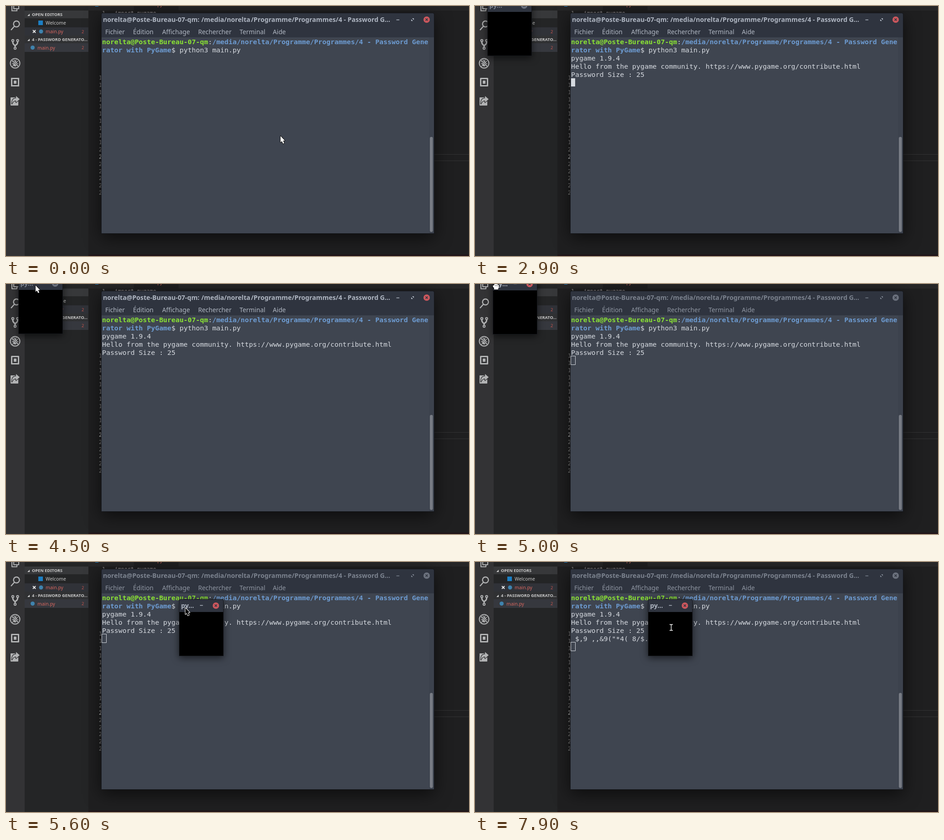
An HTML page with a canvas for the animation above (8 s loop, 1017 px wide and 550 px high).

```html
<!DOCTYPE html>
<html lang="fr">
<head>
<meta charset="utf-8">
<title>Terminal</title>
<style>
html, body { margin: 0; width: 100%; height: 100%; overflow: hidden; background: #1e1e1e; }
canvas { display: block; }
</style>
</head>
<body>
<canvas width="1017" height="550"></canvas>
<script>
const ctx = document.querySelector('canvas').getContext('2d');
const LOOP = 8000, STEP = 100;
const SANS = '"Noto Sans", "Open Sans", sans-serif';
const MONO = '"DejaVu Sans Mono", monospace';
const CELL = 8.96, ROW = 18, LEFT = 211, TOP = 69;
const USER = 'norelta', HOST = 'Poste-Bureau-07-qm';
const INK = '#d6dae0', BAR = '#2f343f';

// [time, x, y, shape]; the shape lasts until the next entry
const pointer = [
  [0, 602, 285, 'arrow'], [100, 610, 286, 'beam'], [800, 610, 286, 'beam'],
  [900, 610, 286, ''], [2900, 610, 286, ''], [3000, 618, 296, 'beam'],
  [3200, 654, 336, 'beam'], [3400, 520, 200, 'beam'], [3600, 335, 75, 'beam'],
  [3700, 269, 38, 'arrow'], [4000, 128, 6, 'arrow'], [4300, 72, 2, 'arrow'],
  [4400, 72, 2, 'arrow'], [4600, 55, 2, 'arrow'], [4700, 55, 2, 'arrow'],
  [4800, 34, 5, 'hand'], [4900, 32, 5, 'hand'], [5000, 46, 6, 'hand'],
  [5200, 351, 97, 'hand'], [5300, 418, 282, 'hand'], [5400, 424, 210, 'hand'],
  [5500, 395, 120, 'hand'], [5600, 393, 100, 'dark'], [5900, 416, 138, 'dark'],
  [6200, 427, 168, 'dark'], [6500, 394, 154, 'dark'], [6800, 412, 180, 'dark'],
  [7100, 438, 146, 'dark'], [7400, 436, 133, 'dark'], [7500, 452, 144, 'beam'],
  [7700, 456, 150, 'beam'], [7900, 431, 144, 'beam']
];

// [time, left, top of the black area]
const popup = [
  [2900, 28, 13], [4800, 28, 13], [4900, 26, 13], [5000, 40, 14], [5200, 345, 107],
  [5300, 412, 292], [5400, 418, 220], [5500, 389, 130], [5600, 381, 110]
];

function along(keys, t) {
  let i = keys.length - 1;
  while (i > 0 && keys[i][0] > t) i--;
  const a = keys[i], b = keys[i + 1] || a;
  const k = b === a ? 0 : Math.max(0, (t - a[0]) / (b[0] - a[0]));
  return { x: a[1] + (b[1] - a[1]) * k, y: a[2] + (b[2] - a[2]) * k, shape: a[3] };
}

function box(x, y, w, h, color, radius = 0) {
  ctx.fillStyle = color;
  ctx.beginPath();
  ctx.roundRect(x, y, w, h, radius);
  ctx.fill();
}

function disc(x, y, r, color) {
  ctx.fillStyle = color;
  ctx.beginPath();
  ctx.arc(x, y, r, 0, 7);
  ctx.fill();
}

function text(str, x, y, color, font, align = 'left') {
  ctx.font = font;
  ctx.fillStyle = color;
  ctx.textAlign = align;
  ctx.fillText(str, x, y);
}

function line(d, color, width = 1) {
  ctx.strokeStyle = color;
  ctx.lineWidth = width;
  ctx.stroke(new Path2D(d));
}

function outlined(d, fill, edge, width = 1.2) {
  const path = new Path2D(d);
  ctx.lineJoin = 'round';
  ctx.lineWidth = width;
  ctx.strokeStyle = edge;
  ctx.fillStyle = fill;
  ctx.stroke(path);
  ctx.fill(path);
}

function shaded(blur, dy, alpha, draw) {
  ctx.save();
  ctx.shadowColor = `rgba(0,0,0,${alpha})`;
  ctx.shadowBlur = blur;
  ctx.shadowOffsetY = dy;
  draw();
  ctx.restore();
}

function activityBar() {
  const c = '#b2b3b4', bg = '#333335';
  box(0, 0, 41, 550, bg);
  line('M13 0V10.5H24V7M17 0V6H28V0', c, 2);
  line('M29.5 39.5A6.5 6.5 0 1 1 16.5 39.5A6.5 6.5 0 1 1 29.5 39.5M18 45L11 53', c, 2.4);
  line('M15 77V80Q15 84 20 87V92M25.5 77V80Q25.5 84 20 87', c, 3);
  for (const [x, y] of [[15, 76], [25.5, 76], [20, 93]]) {
    disc(x, y, 3.2, c);
    disc(x, y, 1.2, bg);
  }
  line('M30.5 126A10.5 10.5 0 1 1 9.5 126A10.5 10.5 0 1 1 30.5 126', c, 2);
  ctx.fillStyle = c;
  ctx.beginPath();
  ctx.ellipse(20, 127, 4, 6, 0, 0, 7);
  ctx.fill();
  line('M13 122L27 131M13 127H27M14 133L26 121M17 118L20 121L23 118', c, 1.3);
  line('M13 119L27 133', bg, 3.5);
  line('M13 119L27 133', c, 1.8);
  line('M12.5 159.5H27.5V175.5H12.5Z', c, 3);
  box(17, 164, 6, 7, c);
  line('M20 164V161M20 171V174', bg, 1.5);
  box(10, 201, 17, 18, c, 1);
  outlined('M13 215Q13 203 22 203V198L30 205L22 212V208Q16 208 13 215Z', c, bg, 2.5);
}

function sidebar() {
  const red = '#d8675f', small = '10.4px ' + SANS, head = 'bold 9.2px ' + SANS;
  box(41, 0, 140, 550, '#242526');
  box(41, 10, 140, 17, '#37383a');
  box(41, 47, 140, 18, '#303238');
  box(41, 65, 140, 17, '#303133');
  box(41, 82, 140, 19, '#36383e');
  for (const y of [22, 77]) {
    ctx.fillStyle = '#d0d0d0';
    ctx.fill(new Path2D(`M47 ${y}H52V${y - 5}Z`));
  }
  text('OPEN EDITORS', 57, 22, '#c9c9c9', head);
  text('4 - PASSWORD GENERATO…', 57, 76.5, '#c9c9c9', head);
  box(71, 32, 10, 10, '#1c7fc4');
  text('Welcome', 87, 41, '#c8c8c8', small);
  line('M59 53L65 59M65 53L59 59', '#e8e8e8', 2);
  disc(77, 56, 4.5, '#3f83ad');
  disc(58.5, 91.5, 4.5, '#3f83ad');
  text('main.py', 87, 60, red, small);
  text('main.py', 69, 95.5, red, small);
  text('2', 171.5, 59.5, '#c4554f', '9.5px ' + SANS, 'right');
  text('2', 171.5, 95, '#c4554f', '9.5px ' + SANS, 'right');
}

function editor() {
  const code = '11.63px ' + MONO, pitch = 15.8;
  box(181, 0, 836, 550, '#1f1f20');
  box(181, 0, 836, 10, '#262627');
  box(281, 0, 98, 10, '#1f1f20');
  box(196, -8, 7, 9, '#1c7fc4');
  text('main.py', 305, 0, '#d8675f', '10.4px ' + SANS);
  text('1', 218, 20, '#858585', code, 'right');
  text('import pygame', 239, 20, '#a5a0a5', code);
  for (let n = 10; n <= 26; n++)
    text(n, 218, 20 + (n - 1) * pitch, n === 21 ? '#d0d0d0' : '#8c8c8c', code, 'right');
  box(900, 326, 117, 1, '#333334');
  box(900, 340, 117, 1, '#333334');
  box(0, 547, 1017, 3, '#211519');
}

function closeButton(x, y, color) {
  disc(x, y, 7, color);
  line(`M${x - 2.5} ${y - 2.5}l5 5m0 -5l-5 5`, BAR, 1.6);
}

function termLine(row, col, str, color = INK, weight = '') {
  text(str, LEFT + col * CELL, TOP + row * ROW + 15, color, `${weight} 14.88px ${MONO}`);
}

function termCursor(row, col, hollow) {
  const x = LEFT + col * CELL, y = TOP + row * ROW;
  if (!hollow) return box(x, y, 9, ROW, INK);
  ctx.strokeStyle = INK;
  ctx.lineWidth = 1;
  ctx.strokeRect(210.5, y - .5, 10, ROW + 1);
}

function terminalFrame(focused) {
  const title = 'bold 14.2px ' + SANS;
  const tone = focused ? '#afb6c2' : '#7b828e';
  shaded(36, 9, .6, () => box(209, 15, 732, 486, '#16181d', [4, 4, 0, 0]));
  box(210, 16, 730, 53, BAR, [3, 3, 0, 0]);
  box(210, 69, 730, 431, '#3f4550');
  box(929, 69, 11, 431, '#3c424d');
  box(931, 288, 6.5, 209, '#777b84', 3);
  text(`${USER}@${HOST}:`, 213, 35, tone, title);
  text(`/media/${USER}`, 429, 35, tone, title);
  text('/Programme/Programmes/4 - Password G…', 844, 35, tone, title, 'right');
  line('M857.5 30.5H864', tone, 1.5);
  ctx.fillStyle = tone;
  ctx.fill(new Path2D('M892 27H896V31ZM890 29V33H894Z'));
  closeButton(924, 30, focused ? '#cc575d' : '#6b717d');
  const menu = { Fichier: 218, Édition: 279, Affichage: 343, Rechercher: 422, Terminal: 513, Aide: 586 };
  for (const name in menu)
    text(name, menu[name], 61.5, focused ? '#b0b7c2' : '#8f96a2', '13.8px ' + SANS);
}

function terminal(t) {
  const focused = t < 4800, blue = '#6d9bd1';
  terminalFrame(focused);
  termLine(0, 0, `${USER}@${HOST}`, '#8ae234', 'bold');
  termLine(0, 26, ':');
  termLine(0, 27, `/media/${USER}/Programme/Programmes/4 - Password Gene`, blue, 'bold');
  termLine(1, 0, 'rator with PyGame', blue, 'bold');
  termLine(1, 17, '$ python3 main.py');
  if (t >= 1000) {
    termLine(2, 0, 'pygame 1.9.4');
    termLine(3, 0, 'Hello from the pygame community. https://www.pygame.org/contribute.html');
    const typed = t < 2400 ? '' : t < 2500 ? '2' : '25';
    termLine(4, 0, 'Password Size : ' + typed);
  }
  if (t >= 7600) termLine(5, 0, ' $,9 ,,&9("*4( 8/$.');

  const within = (a, b) => t >= a && t < b;
  if (within(300, 900)) termCursor(1, 35);
  if (within(900, 1000)) termCursor(2, 0);
  if (within(1000, 2000) || within(2100, 2400)) termCursor(4, 16);
  if (within(2400, 2500)) termCursor(4, 17);
  if (within(2500, 2800)) termCursor(4, 18);
  if (within(2800, 3400) || within(4000, 4500)) termCursor(5, 0);
  if (!focused) termCursor(t < 7600 ? 5 : 6, 0, true);
}

function gameWindow(t) {
  if (t < popup[0][0]) return;
  const { x, y } = along(popup, t), active = t >= 4800;
  const tone = active ? '#afb6c2' : '#7b828e';
  shaded(16, 4, .6, () => box(x - 1, y - 28, 98, 125, '#16181d', [3, 3, 0, 0]));
  box(x, y - 27, 96, 27, BAR, [3, 3, 0, 0]);
  box(x, y, 96, 96, '#000');
  text('py…', x + 3.5, y - 9, tone, 'bold 14.2px ' + SANS);
  line(`M${x + 45} ${y - 14.5}h6.5`, tone, 1.5);
  closeButton(x + 80, y - 14, active ? '#cc575d' : '#6b717d');
}

function drawPointer(t) {
  const { x, y, shape } = along(pointer, t);
  if (!shape) return;
  ctx.save();
  ctx.translate(Math.round(x), Math.round(y));
  if (shape === 'beam') {
    const d = 'M-3.5 -6.5H-1L0 -5.5L1 -6.5H3.5M0 -5.5V5.5M-3.5 6.5H-1L0 5.5L1 6.5H3.5';
    line(d, '#111', 3);
    line(d, '#fff', 1.3);
  } else if (shape === 'hand') {
    outlined('M-4 6V3L-6.5 0V-3H-4V-5.5H-1.5V-6.5H1.5V-5.5H4V-4H6.5V2L5 4V6Z', '#fff', '#111', 2);
    line('M-1.5 -4V-1M1.5 -4V-1M4 -3V-1', '#333', .8);
  } else {
    const dark = shape === 'dark';
    outlined('M1 1V15L4 12.2L6.5 17.8L9 16.7L6.6 11.2H10.6Z',
      dark ? '#000' : '#fff', dark ? '#fff' : '#111', 2);
  }
  ctx.restore();
}

function frame(now) {
  const t = Math.floor((now % LOOP) / STEP) * STEP;
  editor();
  activityBar();
  sidebar();
  terminal(t);
  gameWindow(t);
  drawPointer(t);
  requestAnimationFrame(frame);
}
requestAnimationFrame(frame);
</script>
</body>
</html>
```
